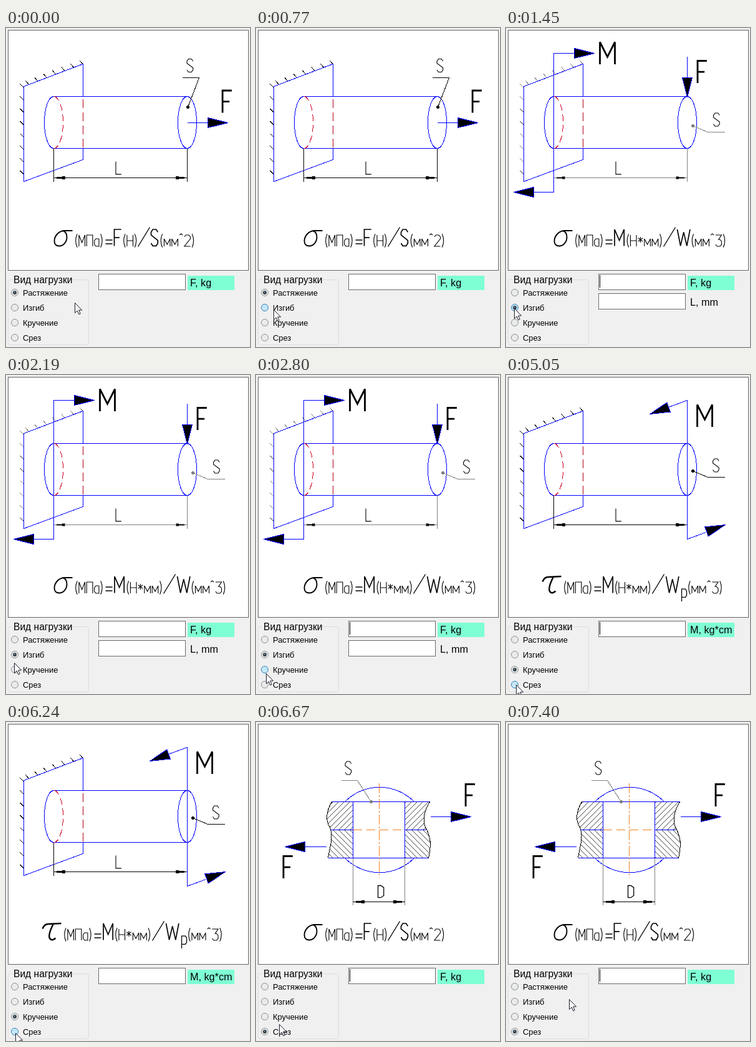
Animation, 391 px wide and 510 px high, one loop 7700 ms. Source, as an HTML page:

```html
<!DOCTYPE html>
<html lang="ru">
<head>
<meta charset="utf-8">
<style>
html, body { margin: 0; width: 100%; height: 100%; overflow: hidden; background: #f0f0f0; }
svg { display: block; font-family: "Liberation Sans", Arial, sans-serif; }
.draw { shape-rendering: crispEdges; }
.draw path, .draw ellipse { fill: none; }
.draw .head { fill: #000; }
.draw .glyph { shape-rendering: geometricPrecision; stroke: #000; vector-effect: non-scaling-stroke; }
.labels { font-size: 12.9px; }
.fields { font-size: 16.2px; }
</style>
</head>
<body>
<svg id="stage" width="391" height="510" viewBox="0 0 391 510"></svg>
<script>
const LOOP = 7700, BLUE = '#0000ff', GRAY = '#808080', BLACK = '#000';

// Stroke lettering on a grid 4 wide and 6 high
const GLYPHS = {
  S: 'M4 1L3 0H1L0 1V2L4 4V5L3 6H1L0 5', F: 'M0 6V0H4M0 3H3', L: 'M0 0V6H4',
  D: 'M0 0V6H2L4 5V1L2 0Z', W: 'M0 0L1 6L2 1L3 6L4 0', p: 'M0 8V2H3L4 3V5L3 6H0',
  М: 'M0 6V0L2 4L4 0V6', П: 'M0 6V0H4V6', Н: 'M0 0V6M4 0V6M0 3H4',
  м: 'M0 6V2L2 5L4 2V6', а: 'M3 2V6H1L0 5V3L1 2H3',
  '(': 'M1.5 -.6Q-.5 3 1.5 6.6', ')': 'M0 -.6Q2 3 0 6.6',
  '*': 'M1.5 1V4M0 1.6L3 3.4M3 1.6L0 3.4', '^': 'M0 0L1 -.7L2 0',
  2: 'M0 1L1 0H3L4 1V2L0 6H4', 3: 'M0 0H4L2 2.4H3L4 3.4V5L3 6H1L0 5'
};
const WIDTHS = { '(': 1.5, ')': 1.5, '^': 2, '*': 3, а: 3 };

const path = (d, color = BLUE, more = '') => `<path d="${d}" stroke="${color}" ${more}/>`;
const ink = (d, weight) => path(d, BLACK, `class="glyph" stroke-width="${weight}"`);

function letters(text, x, y, u = 2.4, v = 3, weight = 1.1) {
  return [...text].map(c => {
    const out = path(GLYPHS[c], BLACK,
      `class="glyph" stroke-width="${weight}" transform="translate(${x} ${y}) scale(${u} ${v})"`);
    x += (WIDTHS[c] || 4) * u + 2.8;
    return out;
  }).join('');
}
const force = (c, x, y) => letters(c, x, y, c === 'F' ? 3.7 : 6, 5.9, 2.8);
const term = (c, x, u) => letters(c, x, 321.5, u, 4.4, 1.7);
const small = (text, x) => letters(text, x, 330.5);

const head = (x, y, angle, len = 32, half = 8, color = BLUE) =>
  path(`M0 0L${-len} ${-half}V${half}Z`, color,
    `class="head" transform="translate(${x} ${y}) rotate(${angle})"`);

const measure = (x1, x2, y, color) => path(`M${x1} ${y}H${x2}`, color) +
  head(x1, y, 180, 18, 2, color) + head(x2, y, 0, 18, 2, color);

// Letter S over a shelf with a leader ending in a dot
const callout = (x, y, shelf, tip, color) => letters('S', x, y, 2.4, 3.5) +
  path(shelf, color) + `<circle cx="${tip[0]}" cy="${tip[1]}" r="2" fill="${color}" stroke="${color}"/>`;

function beam(color) {
  let ticks = '';
  for (let y = 95; y < 245; y += 19.8) ticks += `M22 ${y - 6}L28 ${y}`;
  for (let x = 36; x < 124; x += 14.4) {
    const y = 93 - (x - 28) * 36 / 95;
    ticks += `M${x - 5} ${y - 6}L${x} ${y}`;
  }
  return path(ticks, color) +
    path('M123 109V57L28 93V245L123 210V192') +
    path('M123 113V192', '#b00018', 'stroke-dasharray="14 7"') +
    path('M76 109H290M76 192H290M76 109A15 41.5 0 0 0 76 192') +
    path('M76 109A15 41.5 0 0 1 76 192', '#d00020', 'stroke-dasharray="11 6"') +
    '<ellipse cx="290" cy="150.5" rx="15" ry="41.5" stroke="#00f"/>' +
    letters('L', 175.5, 213, 2.2, 3.4) + measure(76, 290, 239, color);
}

const sigma = ink('M106 323.5H94C84 323.5 77 332 77 340C77 346 81 348 85 348C92 348 97 341 97 334C97 329 95 325 91 324', 1.9);
const tau = ink('M58 330Q61 322.5 67 322.5L88 321.5M75 323Q66 341 70 346Q73 350 79 345', 2.5);
const unit = x => small('(МПа)', x) + ink(`M${x + 49} 338.5h11m-11 6h11`, 1.7);
const slash = x => ink(`M${x} 349l19 -31`, 1.4);

const areaFormula = sigma + unit(110) + term('F', 173, 2.8) + small('(Н)', 187) +
  slash(211) + term('S', 232, 2.7) + small('(мм^2)', 246.5);

const tension = beam(BLACK) + path('M76 192V245M290 192V245', BLACK) +
  callout(289.5, 49, 'M282 79H309L291 126', [291, 126], BLACK) +
  force('F', 346.5, 99.5) + path('M290 151H325') + head(355, 151, 0) + areaFormula;

const bending = beam(GRAY) + path('M290 192V245', GRAY) +
  path('M110 40H76V262H43M290 45V80') +
  head(141, 40, 0) + head(12, 262, 180) + head(290, 110, 90, 31) +
  force('М', 150, 22) + force('F', 306.5, 52) +
  callout(332, 135.5, 'M350 166H323L299 156', [299, 156], GRAY) +
  sigma + unit(110) + term('М', 173.5, 3.8) + small('(Н*мм)', 192.5) +
  slash(252) + term('W', 274, 5.1) + small('(мм^3)', 296.5);

const torsion = beam(BLACK) + path('M76 192V245', BLACK) +
  path('M260 51L290 40V262L320 251') + head(230, 62, 160) + head(351, 239, -20) +
  force('М', 306, 47) + callout(331, 133.5, 'M350 163H323L299 153', [299, 153], BLACK) +
  tau + unit(92) + term('М', 155.5, 3.8) + small('(Н*мм)', 174) +
  slash(234) + term('W', 256, 5.1) + letters('p', 281, 335, 2, 3.3, 1.3) + small('(мм^3)', 291);

function shear() {
  const left = 'C111 145 111 157 118 168C124 184 118 198 115 217';
  const right = 'C269 142 266 156 271 168C281 185 280 198 276 217';
  let hatch = '';
  for (let x = 60; x < 320; x += 9) hatch += `M${x} 172l45 -45M${x} 172l45 45`;
  return `<clipPath id="plate"><path d="M121 127${left}H276C280 198 281 185 271 168C266 156 269 142 278 127Z"/></clipPath>` +
    path(hatch, '#444', 'clip-path="url(#plate)"') +
    '<rect x="155" y="127" width="83" height="90" fill="#fff"/>' +
    path(`M121 127${left}M278 127${right}`, BLACK) +
    path('M142 127A78 78 0 0 1 253 127M142 217A78 78 0 0 0 253 217M118 172H155M238 172H271') +
    path('M121 127H278M115 217H276M155 127V217M238 127V217') +
    path('M155 172H238', '#f08020', 'stroke-dasharray="14 7"') +
    path('M197 97V248', '#f08020', 'stroke-dasharray="16 3 3 3"') +
    path('M155 217V292M238 217V292', GRAY) + measure(155, 238, 287, BLACK) +
    letters('D', 195, 261, 2.3, 3.2, 1.3) +
    callout(142.5, 62.5, 'M136 93H162L184 127', [184, 127], GRAY) +
    path('M279 151H313M112 199H78') + head(344, 151, 0) + head(46, 199, 180) +
    force('F', 335.5, 99) + force('F', 43.5, 214) + areaFormula;
}

const scenes = [tension, bending, torsion, shear()];
const options = ['Растяжение', 'Изгиб', 'Кручение', 'Срез'];
const rowY = i => 423 + 24 * i;
const field = y => `<rect x="148.5" y="${y}.5" width="139" height="25" fill="#fff" stroke="#6a6a6a"/>`;

stage.innerHTML = `
  <rect width="391" height="510" fill="#f0f0f0"/>
  <rect x="3.5" y="3.5" width="385" height="384" fill="#fff" stroke="#646464"/>
  <g class="draw" transform="translate(.5 .5)">${scenes.map(s => `<g class="scene">${s}</g>`).join('')}</g>
  <rect x="3.5" y="402.5" width="129" height="104" rx="3" fill="none" stroke="#dcdcdc"/>
  <rect x="10" y="396" width="96" height="14" fill="#f0f0f0"/>
  <text x="12" y="408" font-size="15.6">Вид нагрузки</text>
  <g class="labels">${options.map((o, i) => `
    <circle class="ring" cx="14" cy="${rowY(i)}" r="5.5"/>
    <g class="dot"><circle cx="14" cy="${rowY(i)}" r="3" fill="#33404a"/><circle cx="13.5" cy="${rowY(i) - .7}" r="1.1" fill="#7d98a8"/></g>
    <text x="27" y="${rowY(i) + 5}">${o}</text>`).join('')}</g>
  <g class="fields">${field(393)}
    <rect x="291" y="396" width="75" height="23" fill="#7fffd4"/>
    <text id="unitLabel" x="295" y="413"></text>
    <g id="lengthField">${field(424)}<text x="295" y="444">L, mm</text></g>
  </g>
  <rect id="caret" x="150" y="395" width="1" height="20"/>
  <path id="cursor" d="M.5 .5V16.5L4.2 13L6.8 18.8L9.2 17.8L6.7 12H11.6Z" fill="#fff" stroke="#1a1a2a"/>`;

const all = name => [...document.getElementsByClassName(name)];
const groups = all('scene'), rings = all('ring'), dots = all('dot');
const show = (el, on) => el.setAttribute('visibility', on ? 'visible' : 'hidden');

const sceneTimes = [1450, 3580, 6350], pickTimes = [1450, 3390, 6350];
const caretFlips = [1450, 1980, 2510, 3030, 3580, 4130, 4620, 5180, 5670, 6160, 6350, 6870, 7400];
const passed = (times, t) => times.filter(x => x <= t).length;

// Pointer track: time, x, y
const track = [
  [0, 110, 439], [230, 110, 439], [590, 28, 450], [770, 28, 450], [830, 13, 448],
  [1880, 13, 448], [2610, 13, 475], [2670, 16, 477], [2900, 16, 477], [3030, 16, 473],
  [3889, 16, 473], [3890, 16, 472], [4080, 16, 472], [4190, 16, 477], [4500, 16, 477],
  [4870, 16, 495], [5105, 16, 495], [5110, 15, 496], [5419, 15, 496], [5420, 15, 497],
  [6490, 15, 497], [7210, 101, 443], [LOOP, 101, 443]
];
function pointer(t) {
  const i = track.findIndex(k => k[0] > t);
  const [a, b] = [track[i - 1], track[i]], p = (t - a[0]) / (b[0] - a[0]);
  return [1, 2].map(n => Math.round(a[n] + (b[n] - a[n]) * p));
}

function render(t) {
  const scene = passed(sceneTimes, t), picked = passed(pickTimes, t), [x, y] = pointer(t);
  groups.forEach((g, i) => show(g, i === scene));
  rings.forEach((ring, i) => {
    const hot = x < 62 && Math.abs(y - rowY(i)) < 10;
    ring.setAttribute('fill', hot ? '#c4e8fa' : '#e9ebec');
    ring.setAttribute('stroke', hot ? '#3c7fb1' : '#8e8f8f');
    show(dots[i], i === picked);
  });
  unitLabel.textContent = scene === 2 ? 'M, kg*cm' : 'F, kg';
  show(lengthField, scene === 1);
  show(caret, passed(caretFlips, t) % 2);
  cursor.setAttribute('transform', `translate(${x} ${y})`);
}

const start = performance.now();
function tick() {
  render((performance.now() - start) % LOOP);
  requestAnimationFrame(tick);
}
tick();
</script>
</body>
</html>
```
